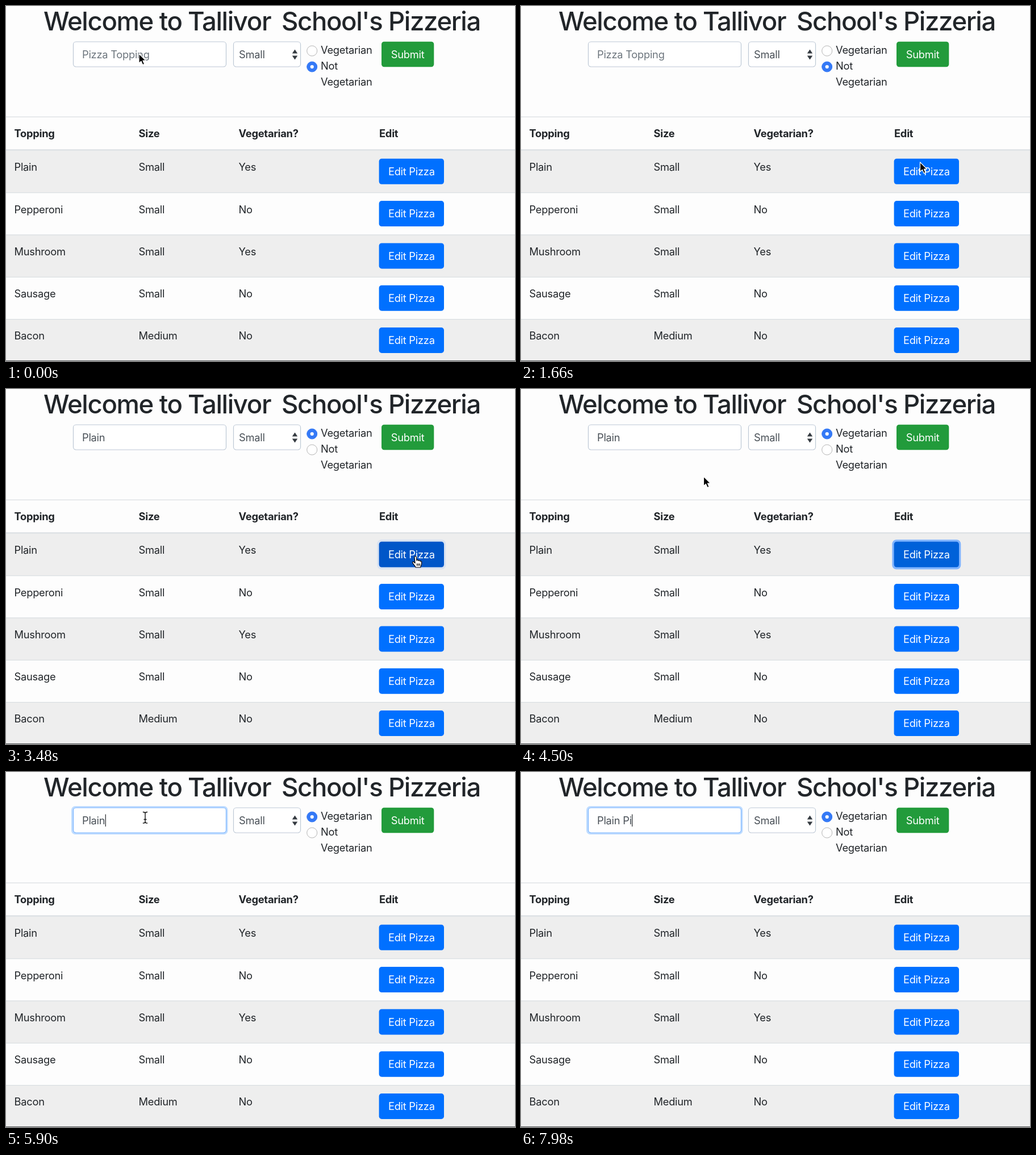
These frames come from a looping animation (896x625 px, 8000 ms). An HTML page:

```html
<!DOCTYPE html>
<html lang="en">
<head>
<meta charset="utf-8">
<title>Pizzeria</title>
<style>
  html, body { margin: 0; width: 100%; height: 100%; overflow: hidden; background: #fdfdfd; }
  svg { display: block; width: 100vw; height: 100vh; }
  text {
    font: 400 18.3px Inter, "Open Sans", sans-serif;
    font-optical-sizing: none;
    letter-spacing: -0.25px;
    fill: #212529;
    white-space: pre;
  }
  .title { font-size: 45.5px; font-weight: 500; letter-spacing: -1.35px; }
  .head { font-weight: 700; }
  .light { fill: #fff; }
  .field { fill: #495057; }
  .mid { text-anchor: middle; }
</style>
</head>
<body>
<svg id="stage" viewBox="0 0 896 625" preserveAspectRatio="none"></svg>
<script>
const LOOP = 8000;
const CLICK = 3450, LEAVE = 4490, FOCUS = 5500;
const KEYS = [[7360, " "], [7620, "P"], [7860, "i"]];
const BLUE = [0, 112, 255], HOVER = [0, 96, 214], PRESSED = [0, 86, 200];
const ROWS = [
  ["Plain", "Small", "Yes"],
  ["Pepperoni", "Small", "No"],
  ["Mushroom", "Small", "Yes"],
  ["Sausage", "Small", "No"],
  ["Bacon", "Medium", "No"]
];
const COLS = [14.5, 233.5, 409.5, 657];
const ROW_H = 74.3;

// Pointer stops: time, x, y
const PATH = [
  [0, 234, 84], [300, 234, 84], [1400, 702.5, 275], [2440, 702.5, 275],
  [2800, 721, 296], [4180, 721, 296], [4500, 321.5, 154],
  [5060, 251, 111], [5400, 245, 80], [LOOP, 245, 80]
];

const stage = document.getElementById("stage");

function add(tag, attrs, parent = stage) {
  const el = document.createElementNS("http://www.w3.org/2000/svg", tag);
  for (const k in attrs) el.setAttribute(k, attrs[k]);
  parent.appendChild(el);
  return el;
}
function label(str, x, y, cls = "") {
  const el = add("text", { x, y, class: cls });
  el.textContent = str;
  return el;
}
function box(x, y, width, height, fill, extra = {}) {
  return add("rect", { x, y, width, height, fill, ...extra });
}
function button(str, x, y, w, h, fill) {
  const el = box(x, y, w, h, fill, { rx: 4.7 });
  label(str, x + w / 2, y + 29.3, "light mid");
  return el;
}
function control(x, w) {
  return box(x + 0.5, 63, w - 1, 44, "#fff", { rx: 4.7, stroke: "#bdc8d5", "stroke-width": 1.2 });
}
function radio(y) {
  return {
    disc: add("circle", { cx: 538.7, cy: y, r: 9 }),
    dot: add("circle", { cx: 538.7, cy: y, r: 3.1, fill: "#fff" })
  };
}

// Heading
const title = add("text", { y: 42.5, class: "title" });
[["Welcome to ", 66], ["Tallivor ", 320], ["School's ", 485], ["Pizzeria", 673]].forEach(([s, x]) => {
  add("tspan", { x }, title).textContent = s;
});

// Form
const inputRing = box(115, 60, 275.5, 50, "#bfdcff", { rx: 7 });
const input = control(118, 270);
const entry = label("", 134, 92.2, "field");
const caret = box(0, 74.5, 1.2, 21.5, "#212529");
control(400, 119);
label("Small", 410, 92.2, "field");
add("path", { d: "M508.5 76.5l4.7 7h-9.4zM508.5 94.5l4.7-7h-9.4z", fill: "#343a40" });
const vegYes = radio(79), vegNo = radio(107);
label("Vegetarian", 554, 84);
label("Not", 554, 112.2);
label("Vegetarian", 554, 140.4);
button("Submit", 661, 62.7, 92.3, 44.6, "#229b3b");

// Table
box(0, 194.6, 896, 1.2, "#d9dee2");
["Topping", "Size", "Vegetarian?", "Edit"].forEach((s, i) => label(s, COLS[i], 231, "head"));
ROWS.forEach((row, i) => {
  const y = 254 + i * ROW_H;
  if (i % 2 === 0) box(0, y, 896, ROW_H, "#eeeeee");
  box(0, y - (i ? 0.2 : 1.6), 896, i ? 1.2 : 2, "#d9dee2");
  row.forEach((s, c) => label(s, COLS[c], y + 36.2));
});
const editRing = box(653.3, 265.2, 121, 52.2, "#80b4ff", { rx: 7.5 });
const edits = ROWS.map((_, i) => button("Edit Pizza", 656.6, 268.8 + i * ROW_H, 114.4, 45, "rgb(" + BLUE + ")"));
box(0, 624, 896, 1, "#55585b");

// Pointers, each with its hot spot at the origin
const ink = { fill: "#000", stroke: "#fff", "stroke-width": 1.2, "stroke-linejoin": "round" };
const arrow = add("path", { d: "M0 0V16.8L3.9 13.2L6.7 19.6L9.6 18.3L6.9 12.1H12Z", ...ink });
const hand = add("path", {
  d: "M-2 0C-2-2 1.2-2 1.4 0L2 6C2.4 4.3 5 4.5 5.2 6.5C6 5.2 8 5.6 8.2 7.4C9 6.5 10.6 7 10.6 8.7" +
     "V11.5C10.6 14 8.8 15 8.8 18H0C-.4 15.4-4 12.6-5.3 10C-6 8.4-4 7.4-2.8 8.8L-.9 10.6Z" +
     "M2.6 11.3V15.2M5 11.3V15.2M7.3 11.3V15.2",
  fill: "#fff", stroke: "#000", "stroke-width": 1.2, "stroke-linejoin": "round"
});
const beam = add("g", { fill: "none", "stroke-linecap": "round" });
[["#fff", 3], ["#111", 1.4]].forEach(([stroke, w]) => add("path", {
  d: "M-3.6-9.5Q0-9.5 0-7V7.5Q0 10-3.6 10M3.6-9.5Q0-9.5 0-7M0 7.5Q0 10 3.6 10M-2 3.5H2",
  stroke, "stroke-width": w
}, beam));

const clamp = v => Math.max(0, Math.min(1, v));
const fade = (t, at) => clamp((t - at) / 150);
const mix = (a, b, k) => a.map((v, i) => Math.round(v + (b[i] - v) * k));
const show = (el, on) => el.setAttribute("visibility", on ? "visible" : "hidden");

function pointerAt(t) {
  let i = 0;
  while (i < PATH.length - 2 && t >= PATH[i + 1][0]) i++;
  const [t0, x0, y0] = PATH[i], [t1, x1, y1] = PATH[i + 1];
  const u = clamp((t - t0) / (t1 - t0)), k = u * u * (3 - 2 * u);
  return [x0 + (x1 - x0) * k, y0 + (y1 - y0) * k];
}

function setRadio({ disc, dot }, on) {
  disc.setAttribute("fill", on ? "#3479f6" : "#fff");
  disc.setAttribute("stroke", on ? "#3479f6" : "#b4b4b4");
  show(dot, on);
}

function render(t) {
  const filled = t >= CLICK, focused = t >= FOCUS;
  const typed = KEYS.filter(k => t >= k[0]);

  entry.textContent = filled ? "Plain" + typed.map(k => k[1]).join("") : "Pizza Topping";
  entry.style.fill = filled ? "#495057" : "#6c757d";
  setRadio(vegYes, filled);
  setRadio(vegNo, !filled);

  const glow = fade(t, FOCUS);
  inputRing.setAttribute("opacity", glow);
  input.setAttribute("stroke", "rgb(" + mix([189, 200, 213], [121, 180, 255], glow) + ")");
  editRing.setAttribute("opacity", fade(t, CLICK) * (1 - glow));

  let shade = mix(BLUE, HOVER, fade(t, 2520));
  shade = mix(shade, PRESSED, fade(t, CLICK - 120) * (1 - fade(t, CLICK + 50)));
  shade = mix(shade, BLUE, fade(t, LEAVE));
  edits[0].setAttribute("fill", "rgb(" + shade + ")");

  const lastKey = typed.length ? typed[typed.length - 1][0] : FOCUS;
  show(caret, focused && (t - lastKey) % 1000 < 500);
  if (focused) caret.setAttribute("x", 134.3 + entry.getComputedTextLength());

  const [x, y] = pointerAt(t);
  const overEdit = t >= 2520 && t < 4240;
  const overInput = t >= 5160;
  [[arrow, !overEdit && !overInput], [hand, overEdit], [beam, overInput && !typed.length]].forEach(([el, on]) => {
    show(el, on);
    el.setAttribute("transform", `translate(${x.toFixed(2)} ${y.toFixed(2)})`);
  });
}

const start = performance.now();
function tick() {
  render((performance.now() - start) % LOOP);
  requestAnimationFrame(tick);
}
render(0);
requestAnimationFrame(tick);
</script>
</body>
</html>
```
